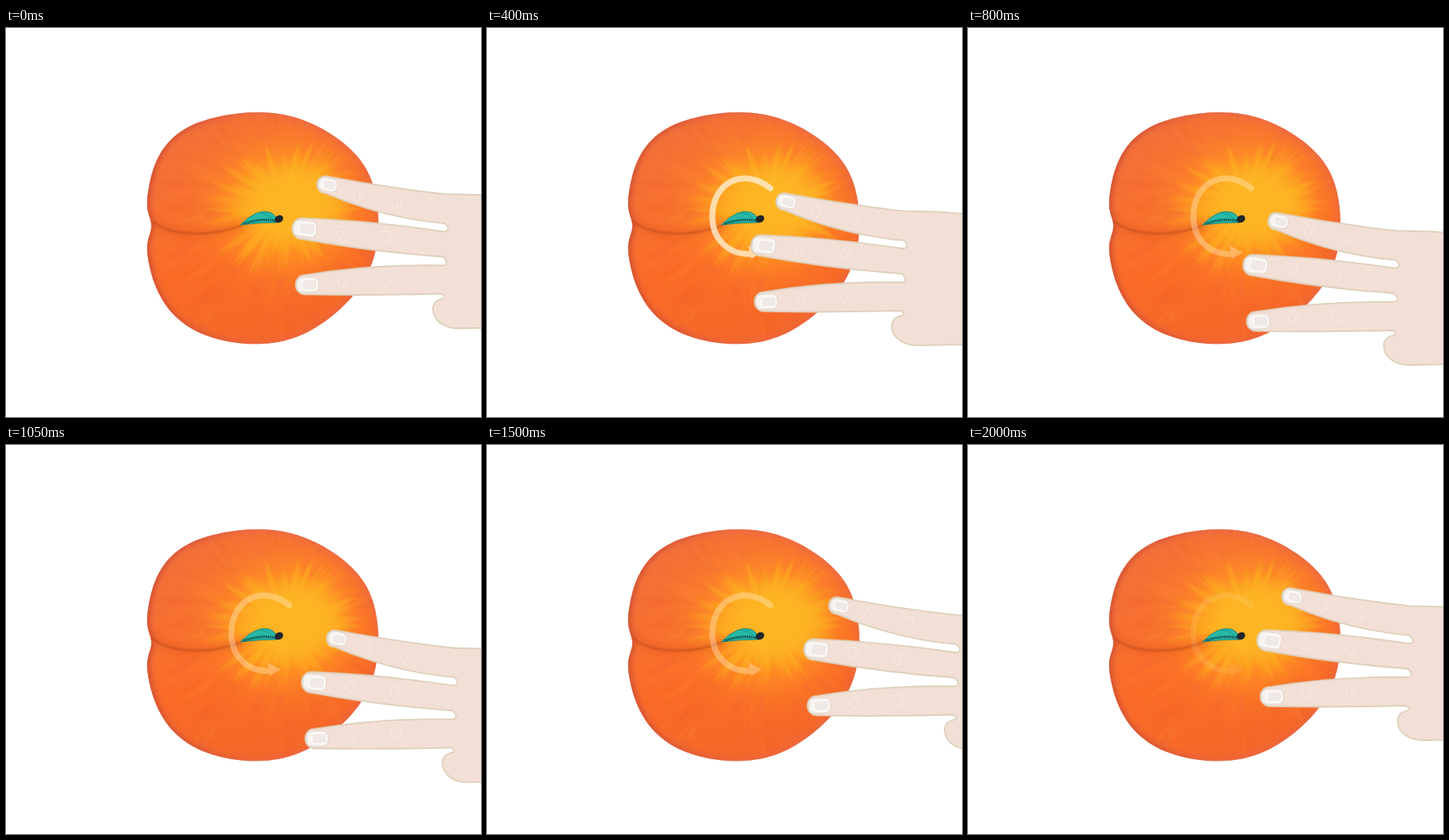
Write an HTML page with a canvas that moves like this. It is 602 by 494 pixels and loops after 2050 ms.

```html
<!DOCTYPE html>
<html lang="en">
<head>
<meta charset="utf-8">
<title>Peach and hand</title>
<style>
  html, body { margin: 0; width: 100%; height: 100%; overflow: hidden; background: #fff; }
  canvas, svg { position: absolute; left: 0; top: 0; width: 602px; height: 494px; }
</style>
</head>
<body>
<canvas id="peach" width="602" height="494"></canvas>
<svg viewBox="0 0 602 494">
  <g id="arrow" fill="#ffefd2" opacity="0">
    <path id="arc" d="M359 203.5C328 178 287 193 285.5 238C285 270 308 288 334 287" fill="none" stroke="#ffefd2"
      stroke-width="7.5" stroke-linecap="round" pathLength="100" stroke-dasharray="100 200"/>
    <path id="head" d="M331 276L348 285L335 293Z"/>
  </g>
  <g id="hand">
    <path id="skin" fill="#f2dfd6" stroke="#ddd0ba" stroke-width="1.8" stroke-linejoin="round"/>
    <g id="details" fill="none" stroke="#fff"></g>
  </g>
</svg>
<script>
const $ = id => document.getElementById(id);
const clamp = v => Math.max(0, Math.min(1, v));
const TAU = 2 * Math.PI;

let seed = 11;
function rnd(lo = 0, hi = 1) {
  seed = (seed + 0x6d2b79f5) | 0;
  let t = Math.imul(seed ^ (seed >>> 15), 1 | seed);
  t = (t + Math.imul(t ^ (t >>> 7), 61 | t)) ^ t;
  return lo + (hi - lo) * (((t ^ (t >>> 14)) >>> 0) / 4294967296);
}

// Peach outline: a circle with lobes of [angle in degrees, height, width in radians]
const lobes = [[223, 15, .45], [135, 11, .5], [330, 5, .35], [50, -4, .4], [181, -7.5, .12]];
function peachOutline() {
  const path = new Path2D();
  for (let deg = 0; deg < 360; deg += 2) {
    const r = lobes.reduce((sum, [at, height, width]) => {
      const gap = ((deg - at + 540) % 360 - 180) * TAU / 360;
      return sum + height * Math.exp(-((gap / width) ** 2));
    }, 146.3);
    const a = deg * TAU / 360;
    path.lineTo(325 + r * Math.cos(a), 254 + r * Math.sin(a));
  }
  path.closePath();
  return path;
}

const ctx = $('peach').getContext('2d');
const CX = 355, CY = 227;

function stroke(path, color, width, alpha, blur) {
  ctx.save();
  ctx.filter = blur ? `blur(${blur}px)` : 'none';
  ctx.globalAlpha = alpha;
  ctx.strokeStyle = color;
  ctx.lineWidth = width;
  ctx.stroke(path);
  ctx.restore();
}

function addStops(gradient, stops) {
  stops.forEach(([offset, color]) => gradient.addColorStop(offset, color));
  return gradient;
}

function glow(x, y, rx, ry, stops) {
  ctx.save();
  ctx.translate(x, y);
  ctx.scale(rx, ry);
  ctx.fillStyle = addStops(ctx.createRadialGradient(0, 0, 0, 0, 0, 1), stops);
  ctx.fillRect(-1, -1, 2, 2);
  ctx.restore();
}

// Tapered brush mark pointing away from the middle
function spike(a, r0, r1, w, color, alpha) {
  const c = Math.cos(a), s = Math.sin(a);
  const pt = (r, o) => [CX + c * r - s * o, CY + s * r + c * o];
  const m = (r0 + r1) / 2, bend = rnd(-4, 4);
  ctx.globalAlpha = alpha;
  ctx.fillStyle = color;
  ctx.beginPath();
  ctx.moveTo(...pt(r0, 0));
  ctx.quadraticCurveTo(...pt(m, w + bend), ...pt(r1, bend));
  ctx.quadraticCurveTo(...pt(m, bend - w), ...pt(r0, 0));
  ctx.fill();
}

function paintPeach() {
  const outline = peachOutline();
  ctx.save();
  ctx.clip(outline);
  ctx.fillStyle = addStops(ctx.createLinearGradient(240, 110, 330, 400),
    [[0, '#f3713b'], [.45, '#f8702f'], [.62, '#fb6b27'], [1, '#f56829']]);
  ctx.fillRect(170, 100, 310, 310);

  glow(CX, CY, 150, 138, [
    [0, 'rgba(255,160,30,.9)'], [.45, 'rgba(255,150,32,.75)'],
    [.7, 'rgba(253,130,38,.4)'], [1, 'rgba(250,112,40,0)']
  ]);

  const tones = ['#e8623a', '#ff8a38', '#f5622c', '#fb8232', '#ea6444', '#ff7427'];
  ctx.save();
  ctx.filter = 'blur(1.8px)';
  for (let i = 0; i < 460; i++) {
    const r = rnd(78, 190);
    spike(rnd(0, TAU), r, r + rnd(22, 55), rnd(3, 8), tones[i % tones.length], rnd(.08, .22));
  }
  ctx.filter = 'blur(1.2px)';
  for (let i = 0; i < 210; i++) {
    const a = rnd(0, TAU);
    const reach = 80 + 10 * Math.cos(2 * a + .5);
    spike(a, 15, rnd(.7, 1.25) * reach, rnd(4, 9), i % 3 ? '#fdb224' : '#fea526', rnd(.16, .32));
  }
  ctx.restore();

  glow(364, 224, 78, 62, [
    [0, 'rgba(253,184,36,1)'], [.55, 'rgba(253,182,36,.85)'], [1, 'rgba(253,176,36,0)']
  ]);

  // Edge: pinkish all round, darker on the left
  stroke(outline, '#e8664c', 12, .4, 5);
  stroke(outline, '#e2685c', 3, .45, 1);
  const side = addStops(ctx.createLinearGradient(180, 0, 310, 0),
    [[0, '#bd3f24'], [.5, '#bd3f2499'], [1, '#bd3f2400']]);
  stroke(outline, side, 8, .5, 2.5);

  const crease = new Path2D('M186 245C200 262 255 268 300 250');
  stroke(crease, '#e2521d', 12, .35, 5);
  stroke(crease, '#b94a1c', 2.6, .6, 1.2);
  ctx.restore();
}

function paintLeaf() {
  const leaf = new Path2D('M297 250Q318 229 334 234Q343 237 344 247Q322 247 297 250Z');
  ctx.fillStyle = '#27b9a7';
  ctx.fill(leaf);
  stroke(leaf, '#0e7a74', 1, .8);
  ctx.setLineDash([1.6, 1]);
  stroke(new Path2D('M301 248.5Q322 241 343 245'), '#0b3c42', 3.2, .85);
  ctx.setLineDash([]);
  stroke(new Path2D('M322 235Q333 236 338 243'), '#128c83', 1, .7);
  ctx.fillStyle = '#20262a';
  ctx.beginPath();
  ctx.ellipse(346, 242.5, 5.5, 4.5, -.5, 0, TAU);
  ctx.fill();
}

// Finger: tip centre and radius, base centre and radius, bend of the axis
const fingers = [
  [405, 199, 10.8, 556, 229.5, 18.6, 4],
  [376, 254.7, 13.3, 554, 274.5, 16, 0],
  [379.5, 326, 12.4, 552, 319.5, 18, -1.5]
];

function buildHand() {
  const bulge = 2.5;
  let d = 'M660 217L602 212';
  let details = '';
  fingers.forEach(([x, y, r, bx, by, br, bend], i) => {
    const mx = (x + bx) / 2, my = (y + by) / 2 + 2 * bend, mr = (r + br) / 2 + 2 * bulge;
    d += i ? `C${bx + 8} ${by - br - 5} ${bx + 8} ${by - br} ${bx} ${by - br}` : `L${bx} ${by - br}`;
    d += `Q${mx} ${my - mr} ${x} ${y - r}` +
         `C${x - 1.33 * r} ${y - r} ${x - 1.33 * r} ${y + r} ${x} ${y + r}` +
         `Q${mx} ${my + mr} ${bx} ${by + br}`;

    const tilt = Math.atan2(by - y, bx - x) * 360 / TAU;
    const w = 2.2 * r, h = 1.55 * r;
    details += `<g transform="translate(${x + 3} ${y}) rotate(${tilt})">
      <rect x="${-w / 2}" y="${-h / 2}" width="${w}" height="${h}" rx="7" fill="#f6f3f0" stroke="#e0d6ca" stroke-width=".8"/>
      <rect x="${-w / 4}" y="${-h / 3}" width="${w * .68}" height="${h * .68}" rx="4" fill="#f1e9e5" stroke-width="1.1"/>
    </g>`;
    for (const k of [.28, .6]) {
      const kx = x + (bx - x) * k, ky = y + (by - y) * k + bend;
      details += `<path transform="translate(${kx} ${ky})" stroke-opacity=".4"
        d="M-6 -8Q6 -10 5 -2Q6 5 -4 8M-6 -4Q-9 3 -3 6M-2 -6Q4 0 -1 6"/>`;
    }
  });
  $('skin').setAttribute('d', d + 'C566 347 541 339 541 357C541 372 556 382 575 381.5L660 380');
  $('details').innerHTML = details;
}

const LOOP = 2050, STEP = 50;

// Hand path: time, x, y
const keys = [
  [0, 0, 0], [400, -28, 21.5], [800, -14, 46.5], [950, 3, 51],
  [1300, 32, 30], [1500, 39, 5], [1740, 24, -29.5], [2000, 3.5, -6.5]
];

// Smooth closed curve through the keys
function handAt(t) {
  const n = keys.length;
  const key = i => {
    const [time, x, y] = keys[(i + n) % n];
    return [time + LOOP * Math.floor(i / n), x, y];
  };
  const i = keys.filter(k => k[0] <= t).length - 1;
  const [a, b, c, e] = [-1, 0, 1, 2].map(o => key(i + o));
  const span = c[0] - b[0], s = (t - b[0]) / span;
  return [1, 2].map(k => {
    const m0 = span * (c[k] - a[k]) / (c[0] - a[0]);
    const m1 = span * (e[k] - b[k]) / (e[0] - b[0]);
    return b[k] + (c[k] - b[k]) * s * s * (3 - 2 * s) + s * (1 - s) * (m0 * (1 - s) - m1 * s);
  });
}

// Bright while being drawn, then dimmer, gone at the end of the loop
function arrowOpacity(t) {
  return (.78 - .42 * clamp((t - 400) / 350)) * clamp(t / STEP) * clamp((LOOP - t) / 160);
}

function draw() {
  const t = Math.floor((performance.now() % LOOP) / STEP) * STEP;
  $('hand').setAttribute('transform', `translate(${handAt(t)})`);
  $('arrow').setAttribute('opacity', arrowOpacity(t));
  $('arc').setAttribute('stroke-dashoffset', 100 * (1 - clamp(t / 350)));
  $('head').setAttribute('visibility', t >= 350 ? 'visible' : 'hidden');
  requestAnimationFrame(draw);
}

paintPeach();
paintLeaf();
buildHand();
draw();
</script>
</body>
</html>
```
